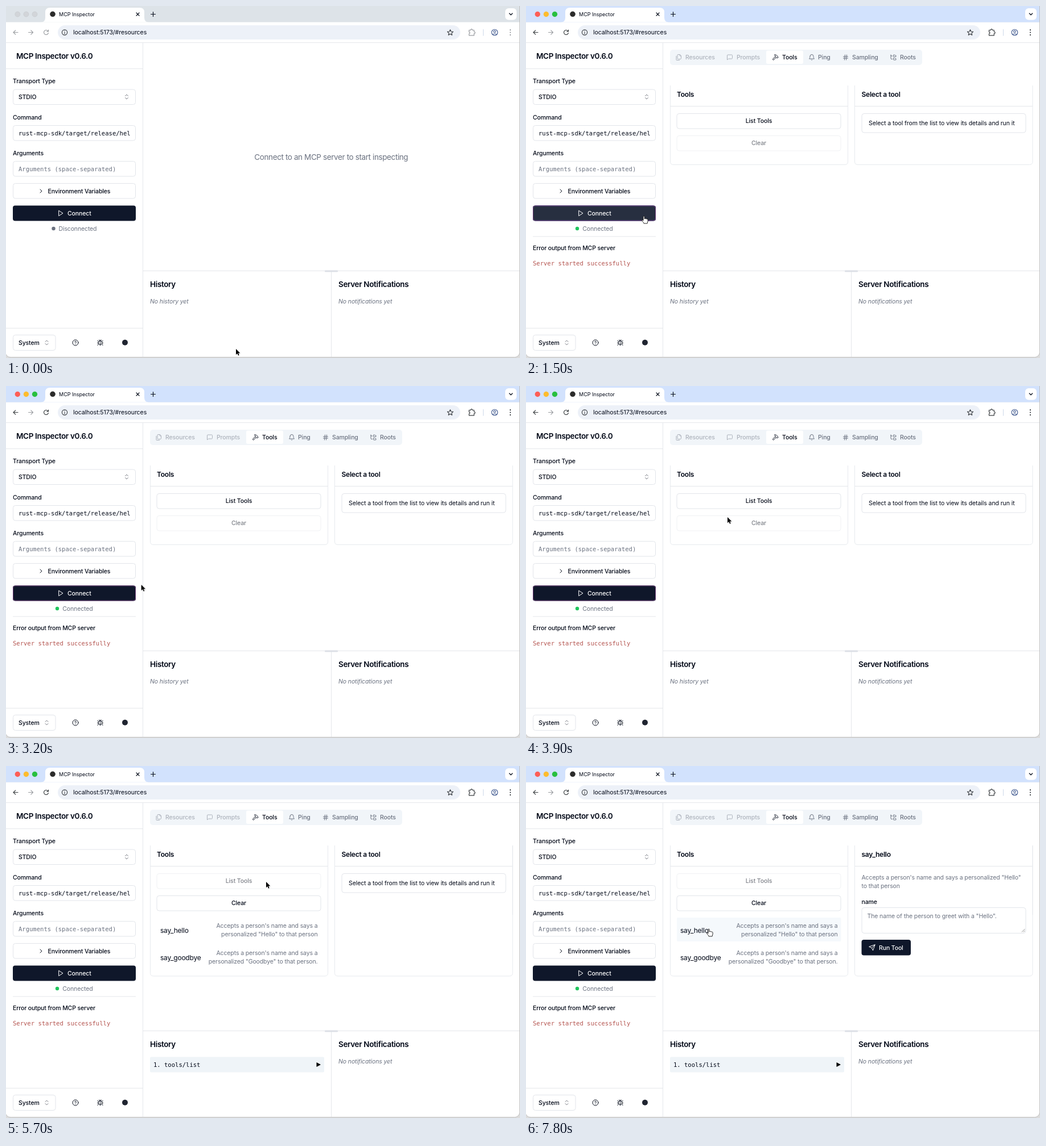
Animation of 903x620 px, one loop 8 s. Source, as an HTML page:

```html
<!DOCTYPE html>
<html lang="en">
<head>
<meta charset="utf-8">
<title>MCP Inspector</title>
<style>
html, body { margin: 0; width: 100%; height: 100%; overflow: hidden; background: #dcdcdc; }
#stage { display: block; width: 903px; height: 620px; }

text { font: 10.5px Inter, sans-serif; letter-spacing: -.12px; fill: #020817; dominant-baseline: central; white-space: pre; }
.mid { text-anchor: middle; }
.end { text-anchor: end; }
.med { font-weight: 500; }
.h1 { font-size: 13.5px; font-weight: 600; letter-spacing: -.35px; }
.h2 { font-size: 12px; font-weight: 600; letter-spacing: -.24px; }
.big { font-size: 13.5px; letter-spacing: -.39px; }
.item { font-size: 12px; letter-spacing: -.22px; }
.url { font-size: 10.6px; letter-spacing: -.1px; }
.title { font-size: 9px; letter-spacing: 0; }
.mono { font-family: "DejaVu Sans Mono", monospace; letter-spacing: .02px; }
.it { font-style: italic; }
.gray { fill: #6b7280; }
.white { fill: #fff; }
.err { fill: #b4534e; }

/* Icons are drawn on a 24 unit grid and shown at half size. */
.i, .ln { fill: none; stroke: currentColor; stroke-linecap: round; stroke-linejoin: round; }
.i { stroke-width: 2; }
.box { fill: #fff; stroke: #e2e5ea; }
.rule { fill: none; stroke: #e5e7eb; }
.card { fill: none; stroke: #e7eaee; }
.dark { fill: #0f172a; }
.cover { fill: #fff; }
.ring { fill: none; stroke: #683873; }
.dim { opacity: .5; }

/* Every part shares one 8 s clock with hard changes. */
.a { animation: 8s step-end infinite; }
#live { animation-name: live; }
#tools { animation-name: connected; }
#conHover { animation-name: con-hover; }
#conRing { animation-name: con-ring; }
#listHover { animation-name: list-hover; }
#listRing { animation-name: list-ring; }
#listed { animation-name: listed; }
#rowHover { animation-name: row-hover; }
#detail { animation-name: detail; }
#hand { animation-name: hand; }
#arrow { animation-name: arrow; }
#cursor { animation-name: move; }
.chrome { animation-name: wake; }

@keyframes live { 0% { opacity: 0 } 8.75%, 100% { opacity: 1 } }
@keyframes wake { 0% { color: #9b9ea2 } 8.75%, 100% { color: #3c4043 } }
@keyframes connected { 0% { opacity: 0 } 17.5%, 100% { opacity: 1 } }
@keyframes con-hover { 0% { opacity: 0 } 10% { opacity: 1 } 36.25%, 100% { opacity: 0 } }
@keyframes con-ring { 0% { opacity: 0 } 15% { opacity: 1 } 66.25%, 100% { opacity: 0 } }
@keyframes list-hover { 0% { opacity: 0 } 52.5% { opacity: 1 } 70%, 100% { opacity: 0 } }
@keyframes list-ring { 0% { opacity: 0 } 66.25% { opacity: 1 } 70%, 100% { opacity: 0 } }
@keyframes listed { 0% { opacity: 0 } 70%, 100% { opacity: 1 } }
@keyframes row-hover { 0% { opacity: 0 } 80%, 100% { opacity: 1 } }
@keyframes detail { 0% { opacity: 0 } 96.25%, 100% { opacity: 1 } }
@keyframes hand {
  0%, 36.25%, 70% { opacity: 0 }
  10%, 52.5%, 80%, 100% { opacity: 1 }
}
@keyframes arrow {
  0%, 36.25%, 70% { opacity: 1 }
  10%, 52.5%, 80%, 100% { opacity: 0 }
}
/* The pointer advances ten times a second. */
@keyframes move {
  0% { transform: translate(404px, 604px); animation-timing-function: steps(4) }
  5% { transform: translate(322px, 506px); animation-timing-function: steps(4) }
  10% { transform: translate(219px, 377px) }
  11.25% { transform: translate(217px, 374px); animation-timing-function: steps(3) }
  15% { transform: translate(207px, 370px) }
  33.75% { transform: translate(207px, 370px); animation-timing-function: steps(8) }
  43.75% { transform: translate(256px, 338px); animation-timing-function: steps(4) }
  48.75% { transform: translate(354px, 231px); animation-timing-function: steps(5) }
  55% { transform: translate(409px, 204px); animation-timing-function: steps(6) }
  62.5% { transform: translate(457px, 204px) }
  75% { transform: translate(457px, 204px); animation-timing-function: steps(4) }
  80% { transform: translate(338px, 270px); animation-timing-function: steps(2) }
  82.5% { transform: translate(297px, 295px); animation-timing-function: steps(3) }
  86.25% { transform: translate(301px, 296px); animation-timing-function: steps(2) }
  88.75% { transform: translate(333px, 285px); animation-timing-function: steps(2) }
  91.25%, 100% { transform: translate(321px, 287px) }
}
</style>
</head>
<body>
<svg id="stage" viewBox="0 0 903 620" color="#0b1220">
  <defs><path id="updown" d="m7 15 5 5 5-5M7 9l5-5 5 5"/></defs>
  <rect x="-1" y="-12" width="903.5" height="630.7" rx="9" fill="#fff" stroke="#bfbfbf"/>

  <!-- Browser frame -->
  <rect width="902" height="28.5" fill="#dde3e8"/>
  <g fill="#d2d5d9" stroke="#c5c8cc" stroke-width=".6">
    <circle cx="20.3" cy="14.5" r="4.5"/><circle cx="35.4" cy="14.5" r="4.5"/><circle cx="50.5" cy="14.5" r="4.5"/>
  </g>
  <g id="live" class="a">
    <rect width="902" height="28.5" fill="#d2e2fd"/>
    <circle cx="20.3" cy="14.5" r="4.7" fill="#fe5f57"/>
    <circle cx="35.4" cy="14.5" r="4.7" fill="#febc2e"/>
    <circle cx="50.5" cy="14.5" r="4.7" fill="#28c03f"/>
  </g>
  <path class="cover" d="M61 28.5q8 0 8-8V11q0-8 8-8h158q8 0 8 8v9.5q0 8 8 8z"/>
  <circle cx="82" cy="14.3" r="4.8" fill="#2b2b2b"/>
  <text class="title" x="93" y="14.5">MCP Inspector</text>
  <path class="ln" d="m229 12 5 5m0-5-5 5M254.5 14.5h8m-4-4v8" stroke-width="1.2"/>
  <rect class="cover" x="877" y="4" width="20" height="20.5" rx="6"/>
  <path class="ln" d="m884.3 13 2.7 2.7 2.7-2.7" stroke-width="1.3"/>

  <rect x="91" y="34" width="707" height="25" rx="12.5" fill="#edf1f8"/>
  <g class="ln a chrome" stroke-width="1.2">
    <path d="M21 46.5h-8m3.7-3.7L13 46.5l3.7 3.7"/>
    <path d="M74 44.5a4 4 0 1 0 .4 3M74.5 42v2.8h-2.8"/>
    <path d="M813.5 42.500h3v-.4a1.400 1.400 0 0 1 2.800 0v.4h3v3h.5a1.400 1.400 0 0 1 0 2.800h-.5v3.500h-8.800v-3a1.500 1.500 0 0 0 0-3z"/>
    <path d="M886 42.200v.1m0 4.200v.1m0 4.200v.1" stroke-width="2.2"/>
  </g>
  <path class="ln" d="M39.5 46.5h8m-3.7-3.7 3.7 3.7-3.7 3.7" stroke-width="1.1" color="#9a9da1"/>
  <g class="ln" stroke-width="1.1" color="#33363a">
    <circle cx="103" cy="46.5" r="4.6"/><path d="M103 46.3v2.4m0-4.6v.1"/>
    <path d="m780.5 41.7 1.5 3.300 3.600.3-2.700 2.400.8 3.500-3.200-1.900-3.200 1.900.8-3.500-2.700-2.400 3.600-.3z"/>
  </g>
  <text class="url" x="118" y="46.7">localhost:5173/#resources</text>
  <path d="M838.5 41v11.5" stroke="#cdd8ea"/>
  <g class="ln" stroke-width="1.1" color="#40598f">
    <circle cx="858.5" cy="46.5" r="5.3"/><circle cx="858.5" cy="45" r="1.8"/><path d="M855 50.3q3.5-3 7 0"/>
  </g>
  <path class="rule" d="M0 64.5h902"/>

  <!-- Sidebar -->
  <path class="rule" d="M240.5 65v553M0 110.5h240M0 567.5h240"/>
  <text class="h1" x="18" y="87.5">MCP Inspector v0.6.0</text>
  <text class="med" x="12" y="132.5">Transport Type</text>
  <rect class="box" x="12.5" y="147" width="215" height="26.5" rx="4"/>
  <text class="med" x="22" y="160.3">STDIO</text>
  <use class="i" href="#updown" transform="translate(206 154) scale(.5)" opacity=".55"/>
  <text class="med" x="12" y="196">Command</text>
  <rect class="box" x="12.5" y="210.5" width="215" height="26.5" rx="4"/>
  <text class="mono" x="22" y="223.7">rust-mcp-sdk/target/release/hel</text>
  <text class="med" x="12" y="259.2">Arguments</text>
  <rect class="box" x="12.5" y="273.5" width="215" height="26.5" rx="4"/>
  <text class="mono gray" x="22" y="287">Arguments (space-separated)</text>
  <rect class="box" x="12.5" y="312.5" width="215" height="26.5" rx="4"/>
  <path class="i" transform="translate(55.5 320) scale(.5)" d="m9 18 6-6-6-6"/>
  <text class="med" x="73.5" y="326">Environment Variables</text>

  <rect class="dark" x="12" y="351.5" width="216" height="27" rx="4"/>
  <rect id="conHover" class="a" x="12.5" y="352" width="215" height="26" rx="4" fill="#272f40" stroke="#414c88"/>
  <rect id="conRing" class="a ring" x="12.5" y="352" width="215" height="26" rx="4"/>
  <path class="i" transform="translate(90 359) scale(.5)" color="#fff" d="m6 3 14 9-14 9z"/>
  <text class="med white" x="108" y="365.2">Connect</text>
  <circle cx="83.5" cy="392" r="3.2" fill="#6b7280"/>
  <text class="gray" x="92.5" y="392.3">Disconnected</text>

  <rect class="box" x="12.5" y="579.5" width="74.5" height="27" rx="4"/>
  <text class="med" x="22" y="593">System</text>
  <use class="i" href="#updown" transform="translate(65.5 587) scale(.5)" opacity=".55"/>
  <g class="i" transform="translate(116 587) scale(.5)"><circle cx="12" cy="12" r="10"/><path d="M9.100 9a3 3 0 0 1 5.800 1c0 2-3 3-3 3M12 17v.01"/></g>
  <path class="i" transform="translate(159.5 587) scale(.5)" d="m8 2 2 2m4 0 2-2M9 7V6a3 3 0 0 1 6 0v1M12 20c-3.300 0-6-2.700-6-6v-3a4 4 0 0 1 4-4h4a4 4 0 0 1 4 4v3c0 3.300-2.700 6-6 6zv-9M6.500 9C4.600 8.800 3 7.100 3 5m3 8H2m1 8c0-2.100 1.700-3.900 3.800-4M21 5c0 2.100-1.600 3.800-3.500 4M22 13h-4m-.8 4c2.100.1 3.800 1.900 3.800 4"/>
  <circle cx="209" cy="592.8" r="5" fill="#1f2430"/>

  <!-- Main panes -->
  <text class="big gray mid" x="571.3" y="266">Connect to an MCP server to start inspecting</text>
  <path class="rule" d="M241 466.5h661M571.5 467v151"/>
  <rect x="560" y="465.5" width="23" height="3" rx="1" fill="#dcdfe6"/>
  <text class="h1" x="253" y="490.3">History</text>
  <text class="it gray" x="253" y="520.3">No history yet</text>
  <text class="h1" x="584" y="490.3">Server Notifications</text>
  <text class="it gray" x="584" y="520.3">No notifications yet</text>

  <g id="tools" class="a">
    <rect class="cover" x="75" y="384" width="100" height="17"/>
    <circle cx="90" cy="392" r="3.2" fill="#22c55e"/>
    <text class="gray" x="99.3" y="392.3">Connected</text>
    <path class="rule" d="M12 406h216"/>
    <text class="med" x="12" y="426.2">Error output from MCP server</text>
    <text class="mono err" x="12" y="453">Server started successfully</text>

    <rect class="cover" x="420" y="250" width="310" height="32"/>
    <rect x="253" y="77" width="443" height="27" rx="5" fill="#f1f5f9"/>
    <rect class="cover" x="422" y="78.5" width="65" height="23.5" rx="3"/>
    <g color="#6b7280">
      <g class="dim">
        <path class="i" transform="translate(262.5 84.5) scale(.5)" d="M20 7h-3a2 2 0 0 1-2-2V2M9 18a2 2 0 0 1-2-2V4a2 2 0 0 1 2-2h7l4 4v10a2 2 0 0 1-2 2zM3 7.600v12.800A1.600 1.600 0 0 0 4.600 22h9.800"/>
        <text class="med gray" x="280" y="90.5">Resources</text>
        <path class="i" transform="translate(352 84.5) scale(.5)" d="M21 15a2 2 0 0 1-2 2H7l-4 4V5a2 2 0 0 1 2-2h14a2 2 0 0 1 2 2z"/>
        <text class="med gray" x="370" y="90.5">Prompts</text>
      </g>
      <path class="i" transform="translate(496 84.5) scale(.5)" d="M6 8a6 6 0 0 1 12 0c0 7 3 9 3 9H3s3-2 3-9M10.300 21a2 2 0 0 0 3.400 0"/>
      <text class="med gray" x="513" y="90.5">Ping</text>
      <path class="i" transform="translate(555.5 84.5) scale(.5)" d="M4 9h16M4 15h16M10 3 8 21M16 3l-2 18"/>
      <text class="med gray" x="573" y="90.5">Sampling</text>
      <path class="i" transform="translate(639.5 84.5) scale(.5)" d="M20 10a1 1 0 0 0 1-1V6a1 1 0 0 0-1-1h-3l-2-2h-2a1 1 0 0 0-1 1v5a1 1 0 0 0 1 1zm0 11a1 1 0 0 0 1-1v-3a1 1 0 0 0-1-1h-3l-2-2h-2a1 1 0 0 0-1 1v5a1 1 0 0 0 1 1zM3 5a2 2 0 0 0 2 2h3M3 3v13a2 2 0 0 0 2 2h3"/>
      <text class="med gray" x="657" y="90.5">Roots</text>
    </g>
    <path class="i" transform="translate(432 84.5) scale(.5)" d="m15 12-8.400 8.400a1 1 0 1 1-3-3L12 9m6 6 4-4m-.5.500-1.900-1.900A2 2 0 0 1 19 8.200V7l-2.300-2.300a6 6 0 0 0-4.200-1.700H9l.9.800A6.200 6.200 0 0 1 12 8.400V10l2 2h1.200a2 2 0 0 1 1.400.6l1.900 1.900"/>
    <text class="med" x="450" y="90.5">Tools</text>

    <path class="card" d="M253.5 140v134q0 5.500 5.500 5.500h301q5.500 0 5.500-5.500V140M577.5 140v134q0 5.500 5.500 5.500h301.500q5.500 0 5.500-5.500V140"/>
    <path class="rule" d="M253 176.5h313M577 176.5h313"/>
    <text class="h2" x="265" y="155.5">Tools</text>
    <text class="h2" x="589.5" y="155.5">Select a tool</text>
    <rect class="box" x="265" y="189.5" width="288" height="26.5" rx="4"/>
    <rect id="listHover" class="a" x="265" y="189.5" width="288" height="26.5" rx="4" fill="#eff5f9" stroke="#6d8297"/>
    <rect id="listRing" class="a ring" x="265" y="189.5" width="288" height="26.5" rx="4"/>
    <text class="med mid" x="409" y="202.7">List Tools</text>
    <g class="dim">
      <rect class="box" x="265" y="228.5" width="288" height="26.5" rx="4"/>
      <text class="med mid" x="409" y="241.7">Clear</text>
    </g>
    <rect class="box" x="590" y="189.5" width="288" height="33.5" rx="4"/>
    <text x="602" y="206.3" letter-spacing="-.08" style="letter-spacing:-.08px">Select a tool from the list to view its details and run it</text>
  </g>

  <g id="listed" class="a">
    <rect class="cover" x="253" y="186" width="313" height="95"/>
    <rect class="cover" x="577" y="262" width="314" height="19"/>
    <path class="card" d="M253.5 140v224.500q0 5.500 5.500 5.500h301q5.500 0 5.500-5.500V140M577.5 140v224.500q0 5.500 5.500 5.500h301.500q5.500 0 5.500-5.500V140"/>
    <g class="dim">
      <rect class="box" x="265" y="189.5" width="288" height="26.5" rx="4"/>
      <text class="med mid" x="409" y="202.7">List Tools</text>
    </g>
    <rect class="box" x="265" y="228.5" width="288" height="26.5" rx="4"/>
    <text class="med mid" x="409" y="241.7">Clear</text>
    <rect id="rowHover" class="a" x="265" y="267" width="288.5" height="42" rx="2" fill="#f5f9fc"/>
    <text class="item" x="271" y="289">say_hello</text>
    <text class="gray end" x="547.5" y="281.2">Accepts a person's name and says a</text>
    <text class="gray end" x="547.5" y="296.2">personalized "Hello" to that person</text>
    <text class="item" x="271" y="337">say_goodbye</text>
    <text class="gray end" x="547.5" y="329.2">Accepts a person's name and says a</text>
    <text class="gray end" x="547.5" y="344.2">personalized "Goodbye" to that person.</text>
    <rect x="253" y="512.5" width="306" height="27" rx="2" fill="#eff4f8"/>
    <text class="mono" x="259" y="525.7">1. tools/list</text>
    <path d="m545.5 522 7.500 4-7.500 4z"/>
  </g>

  <g id="detail" class="a">
    <rect class="cover" x="588" y="146" width="100" height="22"/>
    <rect class="cover" x="588" y="186" width="292" height="40"/>
    <text class="h2" x="589.5" y="155.5">say_hello</text>
    <text class="gray" x="589.5" y="196.7">Accepts a person's name and says a personalized "Hello"</text>
    <text class="gray" x="589.5" y="211.7">to that person</text>
    <text class="med" x="589.5" y="239">name</text>
    <rect class="box" x="590" y="249.5" width="288" height="45" rx="4"/>
    <text class="gray" x="599.5" y="264">The name of the person to greet with a "Hello".</text>
    <path d="m871 292.5 5.500-5.500m-2.500 5.500 2.500-2.500" stroke="#777" stroke-width=".8"/>
    <rect class="dark" x="589.5" y="306" width="86.5" height="27.5" rx="4"/>
    <path class="i" transform="translate(602 314) scale(.5)" color="#fff" d="m22 2-7 20-4-9-9-4zL11 13"/>
    <text class="med white" x="620" y="320">Run Tool</text>
  </g>

  <g id="cursor" class="a">
    <path id="arrow" class="a" d="M0 0v10.300l2.400-2.200L4 11.700l1.700-.8-1.600-3.400h3.300z" fill="#000" stroke="#fff" stroke-width=".8" paint-order="stroke"/>
    <path id="hand" class="a" d="M-1 8V1.200a1.100 1.100 0 0 1 2.200 0V5c.1-1 2-1 2.100.1.2-.8 1.900-.7 2 .4.300-.6 1.800-.4 1.800.9V9c0 1.500-1 2.200-1 4H0c0-2-3.200-3.800-3.400-5.600C-3.300 6.300-2 6.600-1 8z" fill="#fff" stroke="#111" stroke-width=".9" stroke-linejoin="round"/>
  </g>
</svg>
</body>
</html>
```
